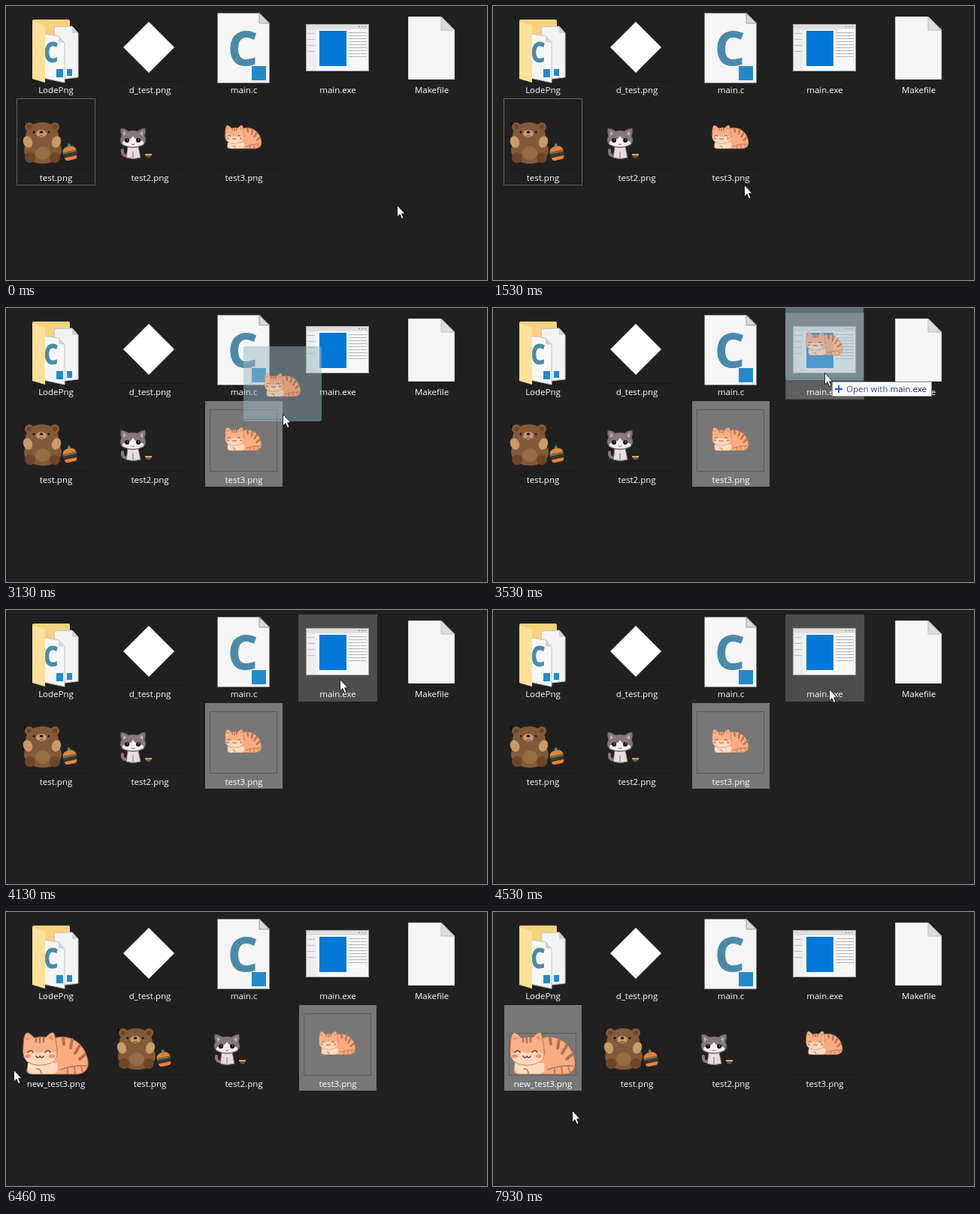
Animation, 640 px wide and 365 px high, one loop 8 s. Source, as an HTML page:

```html
<!DOCTYPE html>
<html lang="en">
<head>
<meta charset="utf-8">
<title>File drop</title>
<style>
html, body { margin: 0; width: 100%; height: 100%; overflow: hidden; background: #202020; }
svg { display: block; width: 640px; height: 365px; }
text { font: 11.5px "Open Sans", "Noto Sans", sans-serif; }
.label { fill: #fff; text-anchor: middle; }
.c { font-weight: 700; fill: #4a8aa8; stroke: #4a8aa8; text-anchor: middle; }
.line { fill: none; stroke-linecap: round; stroke-linejoin: round; }
</style>
</head>
<body>
<svg viewBox="0 0 640 365">
  <defs>
    <g id="folder">
      <path d="M21 14Q21 12 23 12H69Q71 12 71 14V88H21Z" fill="#f6d37c"/>
      <path d="M50 22L74 21L82 30V89L56 92Z" fill="#f3f3f3" stroke="#c4c4c4"/>
      <path d="M74 21V30H82Z" fill="#d2d2d2"/>
      <rect x="67" y="78" width="7" height="9" fill="#2489ca"/>
      <path d="M36 31L56 34L64 43V96L36 90Z" fill="#f7f7f7" stroke="#c4c4c4"/>
      <path d="M56 34V42L64 43Z" fill="#d2d2d2"/>
      <text class="c" style="font-size:37px" transform="translate(46 69) scale(.8 1)">C</text>
      <rect x="53" y="78" width="9" height="11" fill="#2489ca"/>
      <path d="M21 14L38 20V96L21 91Z" fill="#fde09a"/>
    </g>
    <g id="diamond"><path d="M51 15L85 49L51 83L17 49Z" fill="#fff"/></g>
    <g id="source">
      <path d="M17.5 3.5H73L86.5 17V96.5H17.5Z" fill="#f5f5f5" stroke="#858585"/>
      <path d="M73 3.5V17H86.5Z" fill="#d9d9d9" stroke="#999"/>
      <text class="c" style="font-size:62px" x="51" y="73">C</text>
      <rect x="63" y="74" width="19" height="19" fill="#2489ca"/>
    </g>
    <g id="program">
      <path d="M10 18H94V81H10Z" fill="#f8f8f8"/>
      <path d="M10 18H94V25H10Z" fill="#dedede"/>
      <path d="M10 25H24V81H10Z" fill="#eee"/>
      <path d="M80 21.5H92" stroke="#888" stroke-dasharray="2 2"/>
      <path d="M17 30V55" stroke="#bbb" stroke-width="10" stroke-dasharray="1 7"/>
      <path d="M28 27H64V74H28Z" fill="#0178d7"/>
      <path d="M79 29V62" stroke="#b5b5b5" stroke-width="24" stroke-dasharray="1 3"/>
      <path d="M10.5 18.5H93.5V80.5H10.5Z" fill="none" stroke="#a5a5a5"/>
    </g>
    <g id="blank">
      <path d="M21.5 8.5H65L82.5 26V91.5H21.5Z" fill="#f5f5f5" stroke="#d5d5d5"/>
      <path d="M65 8.5V26H82.5Z" fill="#dcdcdc" stroke="#bbb"/>
    </g>
    <g id="bear">
      <path d="M9 32L14 35L10 38Z" fill="#0c0908"/>
      <g fill="#845938">
        <circle cx="17" cy="38" r="6"/><circle cx="51" cy="38" r="6"/>
        <ellipse cx="35" cy="69" rx="25" ry="18"/><ellipse cx="34" cy="50" rx="22" ry="18"/>
      </g>
      <g fill="#6d4528">
        <circle cx="17" cy="38" r="3"/><circle cx="51" cy="38" r="3"/>
        <circle cx="18" cy="79" r="7"/><circle cx="51" cy="79" r="7"/>
      </g>
      <ellipse cx="35" cy="73" rx="10" ry="9" fill="#986c44"/>
      <g fill="#c99a6a">
        <ellipse cx="15" cy="58" rx="6" ry="8" transform="rotate(-20 15 58)"/>
        <ellipse cx="53" cy="58" rx="6" ry="8" transform="rotate(20 53 58)"/>
        <ellipse cx="33" cy="47" rx="7" ry="5"/>
      </g>
      <g fill="#21140d"><circle cx="23" cy="45" r="1.5"/><circle cx="43" cy="45" r="1.5"/><ellipse cx="33" cy="45" rx="2.5" ry="1.7"/></g>
      <path class="line" d="M30 51Q33 48 36 51" stroke="#5a3822"/>
      <g transform="translate(71 73) rotate(-12) scale(.92)">
        <path d="M-10 -3Q-9 -10 0 -10Q9 -10 10 -3Z" fill="#e8813c"/>
        <path d="M-10 -3H10V0H-10Z" fill="#5d7c48"/><path d="M-10 0H10V4H-10Z" fill="#46312f"/>
        <path d="M-9 5H9Q9 10 5 10H-5Q-9 10 -9 5Z" fill="#e8813c"/>
        <path d="M-2 -10L1 -15L4 -10Z" fill="#3f9a68"/>
      </g>
    </g>
    <g id="kitten">
      <path class="line" d="M24 76Q15 78 16 69" stroke="#857a7f" stroke-width="4"/>
      <path d="M23 64H37L40 79Q30 82 21 79Z" fill="#e6dedd" stroke="#7a6e73"/>
      <path d="M14 40Q19 40 24 44Q30 42 36 44Q41 40 46 40Q47 46 45 50Q49 56 44 62Q30 69 16 62Q11 56 15 50Q13 45 14 40Z" fill="#82777c" stroke="#6a5f64"/>
      <path d="M17 43L21 47L17 50ZM43 43L39 47L43 50Z" fill="#cfaeac"/>
      <path d="M30 50Q33 56 43 57Q46 60 42 62Q30 67 18 62Q14 60 17 57Q27 56 30 50Z" fill="#f5eeee"/>
      <circle cx="22" cy="56" r="3" fill="#171317"/><circle cx="37" cy="56" r="3" fill="#171317"/>
      <path d="M22 55h1M37 55h1" stroke="#fff"/>
      <path class="line" d="M28 61Q30 63 32 61M30 71V79" stroke="#83676c"/>
      <path d="M46 74H55L53 79H48Z" fill="#7a5639"/><path d="M46 74H55V76H46Z" fill="#c9ad7e"/>
    </g>
    <g id="ginger">
      <path d="M44 9C64 3 82 15 87 32C93 48 86 57 74 57H14C6 57 6 50 12 43Z" fill="#faab80" stroke="#ad7152"/>
      <path d="M9 42H48Q51 57 41 56.5H14Q7 54 9 42Z" fill="#fddcc0"/>
      <path class="line" d="M56 9L57 17M68 11L66 22M78 19L72 29M85 31L78 37" stroke="#b07350" stroke-width="4"/>
      <path class="line" d="M87 46Q70 45 53 51M62 50V56M71 48L72 56M80 47L82 54M27 56Q27 50 21 50" stroke="#ad7052" stroke-width="1.5"/>
      <path d="M3 22C3 14 4 3 8 2C12 2 15 6 18 9Q26 6 33 8C37 3 42 0 44 3C46 8 47 16 48 24C50 38 40 45 25 45C8 45 1 36 3 22Z" fill="#fbb087" stroke="#ad7152"/>
      <path d="M4 31Q14 24 25 29Q37 24 47.500 31C47 40 38 44.500 25 44.500C11 44.500 5 39 4 31Z" fill="#fdd9ba"/>
      <path d="M6 12Q7 4 13 10ZM37 9Q42 2 43 13Z" fill="#ec8c76"/>
      <path class="line" d="M20 9V14M25 8V15M30 8V14" stroke="#b07350" stroke-width="2.500"/>
      <ellipse cx="9" cy="33" rx="4" ry="2.500" fill="#f28c7b"/><ellipse cx="41" cy="33" rx="4" ry="2.500" fill="#f28c7b"/>
      <path class="line" d="M9 28Q13 23 16 28M32 28Q36 23 39 28M20 33Q23 37 25 33Q28 37 30 33" stroke="#714331" stroke-width="1.600"/>
    </g>
    <g id="small"><use href="#ginger" transform="translate(26 35) scale(.56)"/></g>
    <g id="large"><use href="#ginger" transform="translate(6 36)"/></g>
  </defs>
  <rect width="640" height="365" fill="#202020"/>
  <g id="files"></g>
  <g id="ghost">
    <rect width="104" height="100" rx="3" fill="#9ab9c4" opacity=".5"/>
    <path d="M1 97.5H103" stroke="#527f91" opacity=".6"/>
    <use href="#small" opacity=".8"/>
  </g>
  <g id="tip">
    <rect x=".5" y=".5" width="132" height="19" fill="#fff" stroke="#909090"/>
    <path d="M4 10H14M9 5V15" stroke="#2462c4" stroke-width="2"/>
    <text x="19" y="14" fill="#2a4aa8">Open with <tspan fill="#101c62">main.exe</tspan></text>
  </g>
  <path id="cursor" d="M.5 .5V16L4 12.6L6.5 18.5L9 17.4L6.6 11.8H11Z" fill="#fff" stroke="#000" stroke-width=".8"/>
</svg>
<script>
const $ = id => document.getElementById(id);
const LOOP = 8000, GRAB = 2800, DRAG = 2860, DROP = 3930, CREATED = 4800, PICK = 6800;

// name, art, column, row
const files = [
  ["LodePng", "folder", 0, 0], ["d_test.png", "diamond", 1, 0], ["main.c", "source", 2, 0],
  ["main.exe", "program", 3, 0], ["Makefile", "blank", 4, 0],
  ["new_test3.png", "large", -1, 1], ["test.png", "bear", 0, 1],
  ["test2.png", "kitten", 1, 1], ["test3.png", "small", 2, 1]
].map(([name, art, col, row]) => {
  const node = document.createElementNS("http://www.w3.org/2000/svg", "g");
  const edge = name.endsWith("png") ? '<path fill="none" stroke="#000" opacity=".25"/>' : "";
  node.innerHTML = `<rect x=".5" y=".5" width="104" height="115"/>${edge}
    <use href="#${art}"/><text class="label" x="52.5" y="110">${name}</text>`;
  $("files").append(node);
  return { name, col, row, node, box: node.querySelector("rect"), edge: node.querySelector("path") };
});

// Pointer strokes: end time, end x, end y, downward bow
const strokes = [
  [0, 520, 265], [930, 131, 314, 50], [1530, 334, 238, 10], [1730, 322, 205],
  [2060, 230, 80, -10], [2330, 190, 150], [2600, 307, 187, 10], [GRAB, 307, 187],
  [3530, 441, 86], [DROP, 442, 86], [4530, 447, 105], [CREATED, 453, 140], [5400, 469, 295],
  [5800, 469, 295], [6460, 10, 210, 75], [6660, 45, 197], [PICK, 45, 197],
  [7260, 100, 301], [7600, 106, 179], [7930, 105, 264], [LOOP, 105, 264]
];

function pointer(t) {
  const i = Math.max(1, strokes.findIndex(s => s[0] >= t));
  const [t0, x0, y0] = strokes[i - 1], [t1, x1, y1, bow = 0] = strokes[i];
  const k = (t - t0) / (t1 - t0);
  return [x0 + (x1 - x0) * k, y0 + (y1 - y0) * k + bow * 4 * k * (1 - k)].map(Math.round);
}

function move(node, x, y) { node.setAttribute("transform", `translate(${x} ${y})`); }
function show(node, on) { node.style.display = on ? "" : "none"; }

function draw(now) {
  const shot = Math.floor((now % LOOP + 7) * .015);
  const t = Math.floor(shot * 100 / 15) * 10 % LOOP;
  const [x, y] = pointer(t);
  const dragging = t >= DRAG && t < DROP;
  const selected = t >= PICK ? "new_test3.png" : t >= GRAB ? "test3.png" : "";
  let target = "";

  for (const { name, col, row, node, box, edge } of files) {
    const left = 14 + 125 * (col + (row && t >= CREATED ? 1 : 0)), top = 6 + 117 * row;
    const hover = x >= left && x < left + 105 && y >= top && y < top + 115;
    const picked = name === selected;
    const focus = !selected && name === "test.png";
    if (hover) target = name;
    move(node, left, top);
    show(node, left > 0);
    box.setAttribute("fill", picked ? "#777" : hover ? dragging ? "#5f5f5f" : "#4d4d4d" : "none");
    box.setAttribute("stroke", focus ? "#666" : picked ? "#202020" : hover ? "#4d4d4d" : "none");
    if (edge) {
      const high = name === "new_test3.png" ? 38.5 : 12.5;
      edge.setAttribute("d", picked || hover ? `M7.5 94.5H96.5V${high}H7.5Z` : "M9 94.5H99");
    }
  }
  show($("ghost"), dragging);
  show($("tip"), dragging && target === "main.exe");
  move($("ghost"), x - 52, y - 90);
  move($("tip"), x + 10, y + 12);
  move($("cursor"), x, y);
  requestAnimationFrame(draw);
}
draw(performance.now());
</script>
</body>
</html>
```
